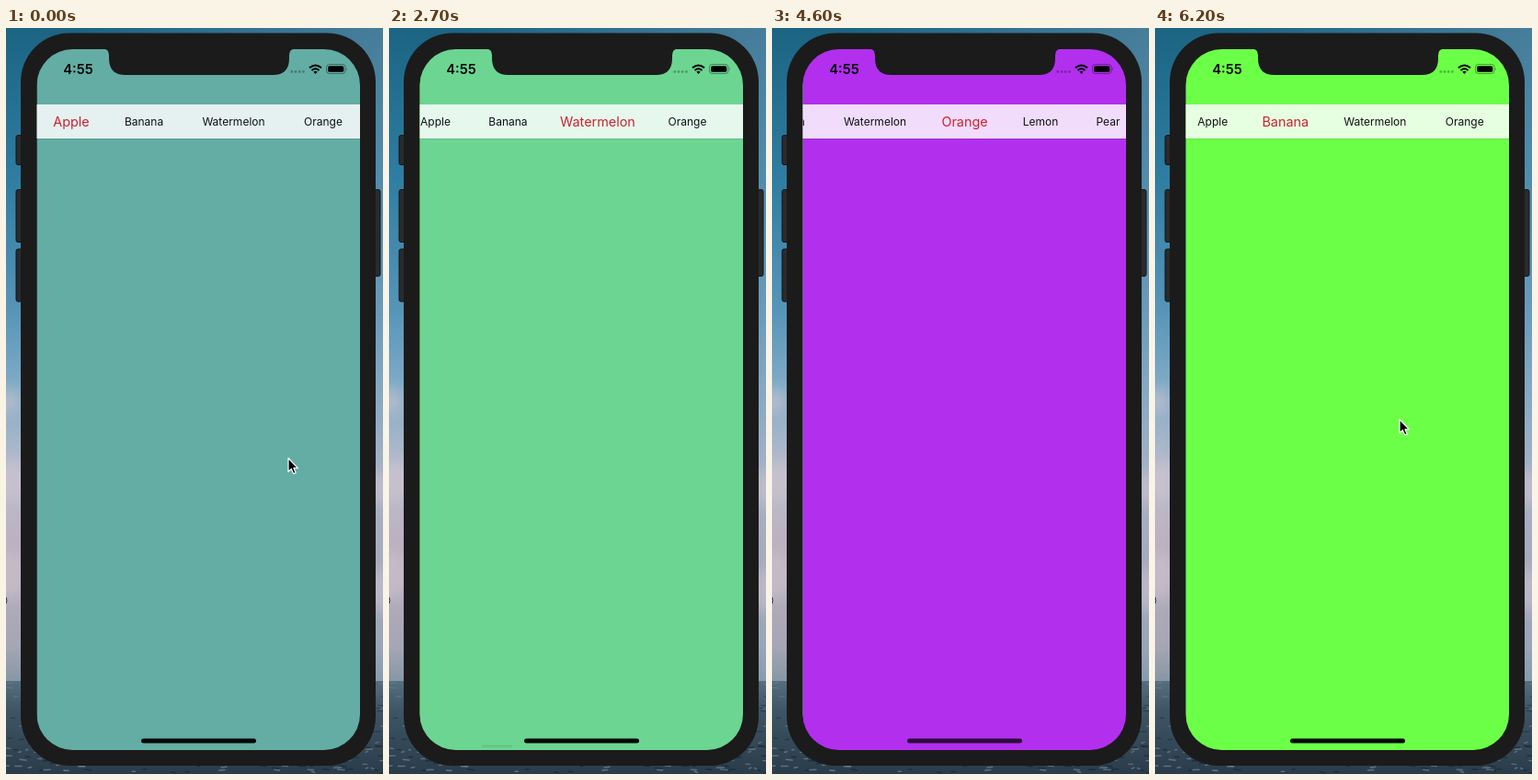
Write an HTML page that moves like this. It is 410 px wide and 810 px high and loops after 6.3 s.

```html
<!DOCTYPE html>
<html lang="en">
<head>
<meta charset="utf-8">
<title>Fruit pager</title>
<style>
html, body { margin: 0; width: 100%; height: 100%; overflow: hidden; background: #3c7f9f; }
svg { display: block; width: 410px; height: 810px; }
text { font-family: Inter, Roboto, sans-serif; }
</style>
</head>
<body>
<svg viewBox="0 0 410 810" xmlns="http://www.w3.org/2000/svg">
  <defs>
    <linearGradient id="sky" x1="0" y1="0" x2="0" y2="1">
      <stop offset="0" stop-color="#1b6482"/>
      <stop offset=".2" stop-color="#2f7da2"/>
      <stop offset=".38" stop-color="#5795b8"/>
      <stop offset=".48" stop-color="#80abc6"/>
      <stop offset=".6" stop-color="#bcbccb"/>
      <stop offset=".7" stop-color="#bcb0bf"/>
      <stop offset=".83" stop-color="#a5a6b4"/>
      <stop offset=".875" stop-color="#8697a5"/>
    </linearGradient>
    <linearGradient id="haze">
      <stop offset=".2" stop-color="#87a3bd" stop-opacity="0"/>
      <stop offset="1" stop-color="#87a3bd" stop-opacity=".4"/>
    </linearGradient>
    <linearGradient id="sea" x1="0" y1="0" x2="0" y2="1">
      <stop offset="0" stop-color="#566f7e"/>
      <stop offset=".3" stop-color="#3f5666"/>
      <stop offset="1" stop-color="#2a3c4a"/>
    </linearGradient>
    <filter id="soft" x="-100%" y="-100%" width="300%" height="300%"><feGaussianBlur stdDeviation="7"/></filter>
    <clipPath id="screen"><rect x="33.5" y="23" width="351.5" height="761" rx="39"/></clipPath>
  </defs>

  <rect width="410" height="810" fill="url(#sky)"/>
  <rect width="410" height="709" fill="url(#haze)"/>
  <g filter="url(#soft)" fill="#cfc5d0" opacity=".55">
    <ellipse cx="2" cy="405" rx="14" ry="14"/>
    <ellipse cx="6" cy="492" rx="20" ry="22"/>
    <ellipse cx="408" cy="500" rx="16" ry="18"/>
    <ellipse cx="4" cy="595" rx="20" ry="26"/>
    <ellipse cx="408" cy="610" rx="16" ry="24"/>
  </g>
  <path d="M0 618q2 4 0 7" fill="none" stroke="#29323d"/>
  <rect y="709" width="410" height="101" fill="url(#sea)"/>
  <g id="waves" stroke-linecap="round"></g>

  <g fill="#292b2e" stroke="#151515">
    <rect x="11" y="116.5" width="9" height="32" rx="2"/>
    <rect x="11" y="175.5" width="9" height="57" rx="2"/>
    <rect x="11" y="240" width="9" height="57" rx="2"/>
    <rect x="398" y="175.5" width="9" height="94" rx="2"/>
  </g>
  <rect x="16" y="5.5" width="386" height="795.5" rx="53" fill="#1b1b1b"/>

  <g clip-path="url(#screen)">
    <g id="pages"></g>
    <rect x="33" y="83" width="353" height="37" fill="#fff" fill-opacity=".83"/>
    <path d="M33 120.5H386" stroke="#000" stroke-opacity=".1"/>
    <g id="labels" text-anchor="middle"></g>
    <rect id="thumb" y="778.8" width="34" height="2" rx="1"/>
    <rect id="home" x="147" y="771.5" width="125" height="5" rx="2.5"/>
  </g>
  <path d="M105 22.5q7 0 7 7v3.5q0 18 18 18H290q18 0 18-18v-3.5q0-7 7-7z" fill="#1b1b1b"/>

  <text x="78.5" y="49.8" font-size="14.7" font-weight="600" text-anchor="middle">4:55</text>
  <g id="dots" fill-opacity=".28"></g>
  <g fill="none" stroke="#000" stroke-width="2">
    <path d="M330 43.3q6.5-5.6 13 0"/>
    <path d="M332.5 46q4-3.4 8 0"/>
  </g>
  <path d="M336.5 49.9l-2.2-2.4q2.2-1.7 4.4 0z"/>
  <rect x="348.5" y="39.5" width="20.5" height="10" rx="3" fill="none" stroke="#000" stroke-opacity=".38"/>
  <rect x="350.2" y="41.2" width="17.1" height="6.6" rx="1.6"/>
  <path d="M370.2 42.8q1.6 1.7 0 3.4z" fill-opacity=".4"/>

  <g id="cursor">
    <g id="ring" fill="none">
      <circle cy="1" r="21.3" stroke="#fff" stroke-opacity=".35" stroke-width="3"/>
      <circle cy="1" r="21.3" stroke="#000" stroke-width="1.4"/>
    </g>
    <path d="M0 0V14.8L3.3 11.7 5.7 17 8.2 15.9 5.9 10.8H10.4Z" stroke="#fff" stroke-width="1.2" stroke-linejoin="round"/>
  </g>
</svg>
<script>
const LOOP = 6300, STEP = 100, LEFT = 33.5, PAGE = 351.5, CENTER = 209.5;
const SMALL = 12, BIG = 14.4, RED = '#c8232f';
const DRAG = 420, SETTLE = 200, GROW = 250, FADE = 250, TRAVEL = 220;
const SLIDE_DELAY = 40, SLIDE = 300;

const $ = id => document.getElementById(id);
function set(el, attrs) {
  for (const k in attrs) el.setAttribute(k, attrs[k]);
}
function add(parent, tag, attrs) {
  const el = document.createElementNS('http://www.w3.org/2000/svg', tag);
  set(el, attrs);
  return parent.appendChild(el);
}
const clamp = v => Math.min(1, Math.max(0, v));
const mix = (a, b, k) => a + (b - a) * k;
const smooth = v => v * v * (3 - 2 * v);
const easeOut = v => 1 - (1 - v) ** 2;
const span = (t, from, length) => clamp((t - from) / length);

// Each swipe drags a share (reach) of a page, then the page settles by itself.
const swipes = [
  { t: 610, from: 0, to: 1, reach: .72, x: 298, y: 477 },
  { t: 2082, from: 1, to: 2, reach: .72, x: 112, y: 502 },
  { t: 3230, from: 2, to: 3, reach: .72, x: 161, y: 602 },
  { t: 4820, from: 3, to: 2, reach: .72, x: 70, y: 560 },
  { t: 5530, from: 2, to: 1, reach: 1, x: 225, y: 480 }
];
const home = { x: 307, y: 467 }, rest = { t: 6200, x: 266, y: 425 };
for (const s of swipes) {
  s.lift = s.t + DRAG;
  s.endX = s.x - (s.to - s.from) * s.reach * PAGE;
  const half = s.t + DRAG * (1 - Math.sqrt(1 - .5 / s.reach));
  s.pick = Math.ceil(half / STEP) * STEP;
}

const pages = ['#63ada4', '#6cff48', '#6cd592', '#b22fee'].map(fill =>
  add($('pages'), 'rect', { y: 20, width: PAGE + 1, height: 768, fill }));

const labels = [['Apple', 71], ['Banana', 150], ['Watermelon', 247.5],
  ['Orange', 345], ['Lemon', 427.5], ['Pear', 501]].map(([name, x]) => {
  const el = add($('labels'), 'text', {});
  el.textContent = name;
  return { el, x };
});

for (let i = 0; i < 4; i++) add($('dots'), 'circle', { cx: 310.8 + i * 4.2, cy: 47.5, r: 1.4 });

let seed = 7;
const rand = () => (seed = seed * 16807 % 2147483647) / 2147483647;
for (let i = 0; i < 420; i++) {
  const depth = rand(), x = rand() * 410;
  add($('waves'), 'path', {
    d: `M${x} ${711 + depth * 98}l${2 + rand() * 6} ${rand() * 2 - 1}`,
    stroke: rand() < .5 ? '#8ea2ae' : '#101f2a',
    'stroke-width': .6 + depth,
    opacity: .5
  });
}

function pageAt(t) {
  return swipes.reduce((p, s) => {
    const k = s.reach * easeOut(span(t, s.t, DRAG));
    return p + (s.to - s.from) * mix(k, 1, easeOut(span(t, s.lift, SETTLE)));
  }, 0);
}

// The label under the selection is centred where the bar can scroll that far.
const slideTo = i => Math.max(0, labels[i].x - CENTER);
function slideAt(t) {
  return swipes.reduce((v, s) =>
    v + (slideTo(s.to) - slideTo(s.from)) * smooth(span(t, s.lift + SLIDE_DELAY, SLIDE)), 0);
}

function cursorAt(t) {
  const n = swipes.filter(s => s.t <= t).length;
  const last = swipes[n - 1], next = swipes[n] || rest;
  if (last && t < last.lift) {
    return [mix(last.x, last.endX, easeOut(span(t, last.t, DRAG))), last.y];
  }
  const x = last ? last.endX : home.x, y = last ? last.y : home.y;
  const k = smooth(span(t, next.t - TRAVEL, TRAVEL));
  return [mix(x, next.x, k), mix(y, next.y, k)];
}

function draw(t) {
  const p = pageAt(t);
  pages.forEach((el, i) => set(el, { x: LEFT + (i - p) * PAGE }));
  set(pages[0], { fill: p > .1 ? '#54a39b' : '#63ada4' });

  const pick = swipes.filter(s => s.pick <= t).pop() || { pick: -GROW, from: -1, to: 0 };
  const grown = smooth(span(t, pick.pick, GROW)), shift = slideAt(t);
  labels.forEach(({ el, x }, i) => {
    const k = i === pick.to ? grown : i === pick.from ? 1 - grown : 0;
    const size = mix(SMALL, BIG, k);
    set(el, {
      x: x - shift, y: 102 + size * .36,
      'font-size': size, fill: i === pick.to ? RED : '#0c1114'
    });
  });

  const glow = Math.max(...swipes.map(s => t < s.t ? 0 : 1 - span(t, s.lift, FADE)));
  set($('thumb'), { x: 62.9 + 18.7 * p, opacity: .45 * glow });
  set($('home'), { opacity: .96 - .22 * clamp((p - 2) * 2) });

  set($('cursor'), { transform: `translate(${cursorAt(t)})` });
  set($('ring'), { opacity: swipes.some(s => t >= s.t && t < s.lift) ? 1 : 0 });
}

const start = performance.now();
function tick() {
  const t = (performance.now() - start) % LOOP;
  draw(Math.floor(t / STEP) * STEP);
  requestAnimationFrame(tick);
}
tick();
</script>
</body>
</html>
```
